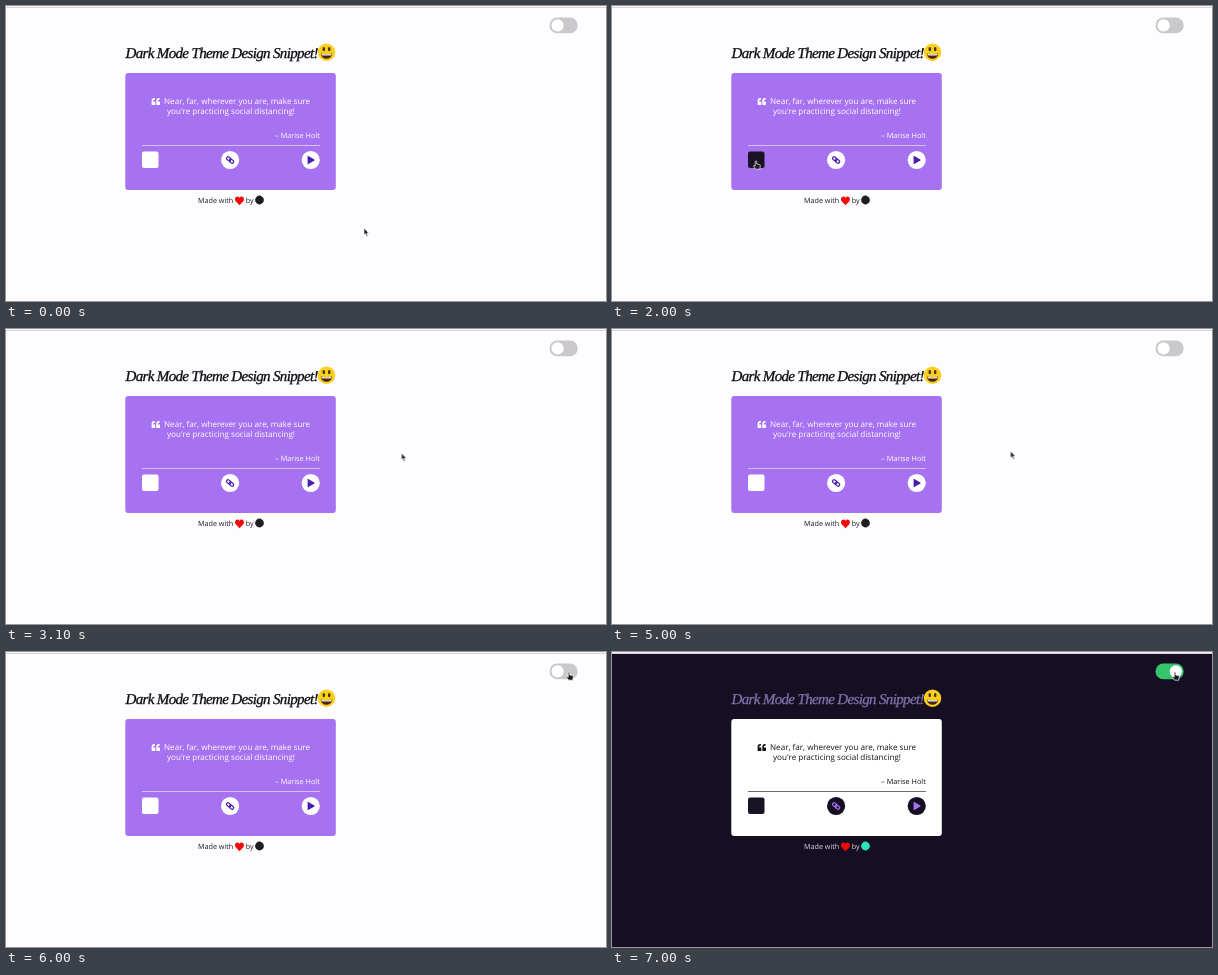
Animation of 600 by 295 pixels, one loop 8000 ms. Source, as an HTML page:

```html
<!DOCTYPE html>
<html lang="en">
<head>
<meta charset="utf-8">
<title>Dark mode snippet</title>
<style>
@property --on { syntax: "<number>"; inherits: true; initial-value: 0; }
@property --hover { syntax: "<number>"; inherits: true; initial-value: 0; }

html, body { margin: 0; width: 100%; height: 100%; overflow: hidden; }
svg { display: block; width: 600px; height: 295px; }

.stage {
  text-rendering: geometricPrecision;
  font-family: "Open Sans", "Noto Sans", sans-serif;
  animation: theme 8s step-end infinite, toggle 8s step-end infinite, hover 8s step-end infinite;
}
.bg { fill: var(--bg); }
.edge { fill: var(--edge); }
.card { fill: var(--card); }
.on-card { fill: var(--text); }
.rule { stroke: var(--rule); stroke-width: .8; }
.disc { fill: var(--disc); }
.icon { fill: var(--icon); }
.chain { fill: none; stroke: var(--icon); stroke-width: 1.25; }
.badge { fill: var(--badge); }
.foot { fill: var(--foot); font-size: 7.2px; }
.quote { font-size: 8.1px; }
.author { font-size: 7.3px; text-anchor: end; }
.title {
  fill: var(--title); stroke: var(--title); stroke-width: .3;
  font: italic 15px "Liberation Serif", "Noto Serif", serif;
  letter-spacing: -.65px;
}
.square {
  fill: color-mix(in srgb, #1a1326 calc(max(var(--on), var(--hover)) * 100%), #fff);
}
.track { fill: color-mix(in srgb, #35c46c calc(var(--on) * 100%), #cac8cb); }
.knob { fill: #fff; transform: translateX(calc(var(--on) * 12.2px)); }

.cursor { animation: move 8s step-end infinite; stroke: #fff; stroke-width: .7; fill: #1a1a1a; }
.arrow { animation: arrow 8s step-end infinite; }
.hand { animation: hand 8s step-end infinite; }

@keyframes theme {
  0% {
    --bg: #fdfcfe; --edge: #d8d5db; --card: #a772f1; --text: #fff; --rule: #e2d2fb;
    --disc: #fff; --icon: #4a1bb0; --badge: #1e1e22; --foot: #1c1c20; --title: #0c0c10;
  }
  80%, 100% {
    --bg: #160e23; --edge: #d3d1d6; --card: #fff; --text: #121016; --rule: #4a464e;
    --disc: #160e23; --icon: #a772f1; --badge: #2be3b4; --foot: #dad6e0; --title: #7d73a8;
  }
}
@keyframes toggle {
  0% { --on: 0; }
  80% { --on: .18; }
  81.25% { --on: .48; }
  82.5% { --on: .72; }
  83.75% { --on: .86; }
  85% { --on: .95; }
  86.25% { --on: .99; }
  87.5%, 100% { --on: 1; }
}
@keyframes hover {
  0% { --hover: 0; }
  20% { --hover: .4; }
  21.25% { --hover: .85; }
  22.5% { --hover: 1; }
  26.25% { --hover: .6; }
  27.5% { --hover: .15; }
  28.75%, 100% { --hover: 0; }
}
@keyframes arrow {
  0%, 26.25%, 100% { opacity: 1; }
  20%, 72.5% { opacity: 0; }
}
@keyframes hand {
  0%, 26.25%, 100% { opacity: 0; }
  20%, 72.5% { opacity: 1; }
}
/* steps() holds the pointer for 100 ms at each place */
@keyframes move {
  0% { transform: translate(358px, 222px); }
  6.25% { transform: translate(358px, 222px); animation-timing-function: steps(2); }
  8.75% { transform: translate(384px, 198px); animation-timing-function: steps(2); }
  11.25% { transform: translate(396px, 130px); }
  12.5% { transform: translate(360px, 70px); }
  13.75% { transform: translate(270px, 39px); }
  15% { transform: translate(170px, 45px); }
  16.25% { transform: translate(112px, 70px); }
  17.5% { transform: translate(116px, 95px); }
  18.75% { transform: translate(128px, 135px); }
  20% { transform: translate(141px, 152px); animation-timing-function: steps(4); }
  25% { transform: translate(144px, 155px); }
  26.25% { transform: translate(172px, 156px); animation-timing-function: steps(2); }
  28.75% { transform: translate(287px, 150px); }
  30% { transform: translate(320px, 146px); animation-timing-function: steps(3); }
  33.75% { transform: translate(378px, 132px); animation-timing-function: steps(4); }
  38.75% { transform: translate(395.5px, 124px); }
  62.5% { transform: translate(398.5px, 122px); }
  65% { transform: translate(492px, 62px); }
  66.25% { transform: translate(492px, 62px); animation-timing-function: steps(3); }
  70% { transform: translate(530px, 40px); animation-timing-function: steps(2); }
  72.5% { transform: translate(557px, 16px); animation-timing-function: steps(2); }
  75%, 100% { transform: translate(563px, 20px); }
}
</style>
</head>
<body>
<svg class="stage" viewBox="0 0 600 295">
  <defs>
    <path id="mark" d="M.4 7h2.9a.4.4 0 0 0 .4-.4V3.9a.4.4 0 0 0-.4-.4H1.6V3c0-.8.6-1.3 1.3-1.3h.4V0h-.7C1 0 0 1.2 0 2.8v3.8a.4.4 0 0 0 .4.4z"/>
  </defs>

  <rect class="bg" width="600" height="295"/>
  <rect width="600" height="1" fill="#f5f4f6"/>
  <rect class="edge" y="1" width="600" height="1"/>

  <rect class="track" x="543.5" y="11.5" width="28.2" height="15.8" rx="7.9"/>
  <circle class="knob" cx="551.6" cy="19.4" r="6.1"/>

  <text class="title" x="119.5" y="52">Dark Mode Theme Design Snippet!</text>
  <g transform="translate(320.5 46.2)">
    <circle r="8.7" fill="#fbcf1d"/>
    <ellipse cx="-2.7" cy="-3.1" rx="1.3" ry="2.2" fill="#4a3208"/>
    <ellipse cx="2.7" cy="-3.1" rx="1.3" ry="2.2" fill="#4a3208"/>
    <path d="M-5.7 1.2Q0 2.4 5.7 1.2Q4.8 6.6 0 6.6T-5.7 1.2z" fill="#4a2508"/>
    <path d="M-5.1 1.5Q0 2.5 5.1 1.5L4.7 3Q0 3.8-4.7 3z" fill="#fff"/>
  </g>

  <rect class="card" x="119.3" y="67" width="210.5" height="117" rx="3"/>
  <g class="on-card">
    <use href="#mark" x="145.6" y="92"/>
    <use href="#mark" x="150.3" y="92"/>
    <text class="quote" x="158" y="98.4">Near, far, wherever you are, make sure</text>
    <text class="quote" x="225" y="108.2" text-anchor="middle">you're practicing social distancing!</text>
    <text class="author" x="313.8" y="132.4">– Marise Holt</text>
  </g>
  <path class="rule" d="M136 139.5H314"/>

  <rect class="square" x="136" y="145.5" width="16.5" height="16.5" rx="2"/>

  <circle class="disc" cx="224.1" cy="154" r="9.1"/>
  <g class="chain" transform="translate(224.1 154) rotate(40)">
    <rect x="-4.2" y="-1.5" width="4.9" height="3" rx="1.5"/>
    <rect x="-.7" y="-1.5" width="4.9" height="3" rx="1.5"/>
  </g>

  <circle class="disc" cx="304.7" cy="154" r="9.1"/>
  <path class="icon" d="M301.6 150.3q0-.8.7-.4l6 3.6q.7.5 0 1l-6 3.6q-.7.4-.7-.4z"/>

  <text class="foot" x="192" y="197">Made with</text>
  <path fill="#f40a0a" d="M233.5 199.3L229.7 195.3C228.3 193.6 229.2 190.6 231.4 190.6Q232.7 190.6 233.5 191.8Q234.3 190.6 235.6 190.6C237.8 190.6 238.7 193.6 237.3 195.3z"/>
  <text class="foot" x="239.7" y="197">by</text>
  <circle class="badge" cx="253.5" cy="194" r="4.4"/>

  <g class="cursor">
    <path class="arrow" d="M0 0V7L1.5 5.7L2.7 8.4L3.9 7.9L2.8 5.2H4.8z"/>
    <path class="hand" d="M-.8.7Q-.8 0 0 0T.8.7V3L3.6 3.6Q4.4 3.8 4.3 4.7L3.8 8.2H-.4L-2.4 5.4Q-2.6 4.5-1.7 4.5L-.8 5.2z"/>
  </g>
</svg>
</body>
</html>
```
